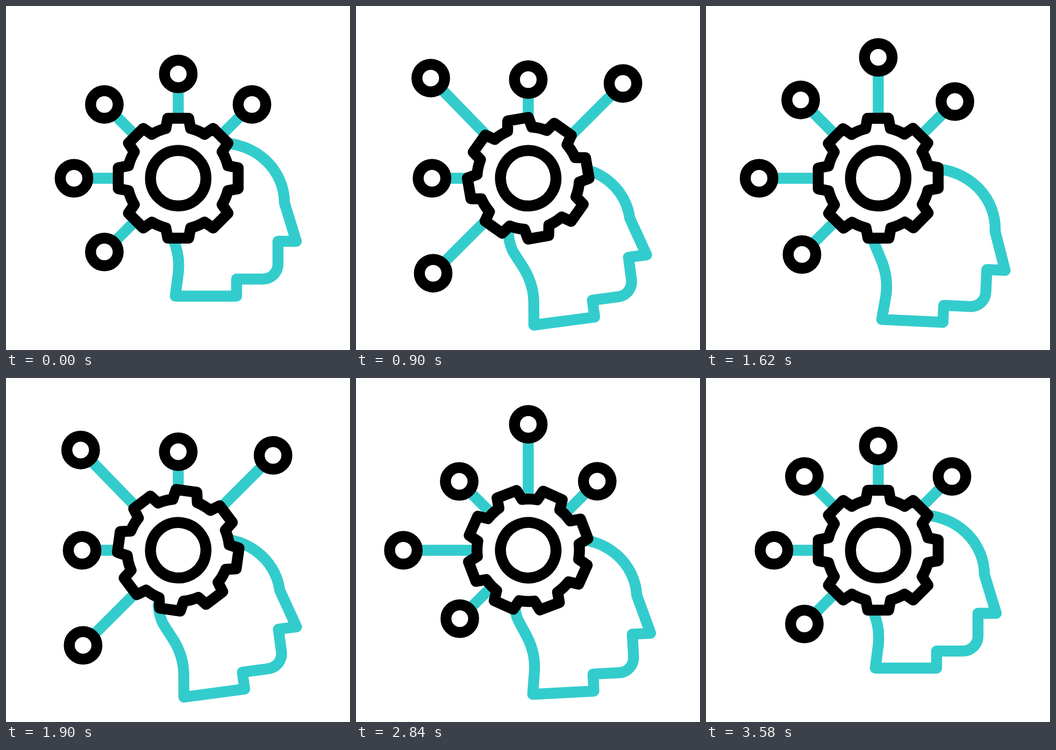
An HTML page for the animation above (3600 ms loop, 640 by 640 pixels).

```html
<!DOCTYPE html>
<html lang="en">
<head>
<meta charset="utf-8">
<title>Thinking head</title>
<style>
  html, body { margin: 0; height: 100%; overflow: hidden; background: #fff; }
  svg { display: block; width: 100%; height: 100%; }
  path, circle, line { stroke-width: 20.4; stroke-linejoin: round; stroke-linecap: round; }
  .teal { stroke: #33cccc; fill: none; }
  .black { stroke: #000; fill: #fff; }
</style>
</head>
<body>
<svg viewBox="0 0 640 640">
  <path id="head" class="teal" d="M375 256 Q388 255 400 255 A118 111 0 0 1 518 366 L540 437.7 H506 V480
    A28 28 0 0 1 478 508 H429 V539.7 H315 L320.5 497 C323 475 320 455 311 434 L295 400 C291 390 290 378 290 365"/>
  <g id="lines"></g>
  <g id="gear">
    <path id="teeth" class="black"/>
    <circle class="black" r="51.6"/>
  </g>
  <g id="nodes"></g>
</svg>
<script>
const LOOP = 3600, CENTER = 320.4;
const $ = id => document.getElementById(id);

function add(parent, tag, attrs) {
  const el = document.createElementNS('http://www.w3.org/2000/svg', tag);
  set(el, attrs);
  return parent.appendChild(el);
}

function set(el, attrs) {
  for (const key in attrs) el.setAttribute(key, attrs[key]);
}

// Eased value at time t on a track of [time, value] keys
function track(t, keys) {
  if (t <= keys[0][0]) return keys[0][1];
  for (let i = 1; i < keys.length; i++) {
    const [t0, v0] = keys[i - 1], [t1, v1] = keys[i];
    if (t < t1) {
      const u = (t - t0) / (t1 - t0);
      return v0 + (v1 - v0) * u * u * (3 - 2 * u);
    }
  }
  return keys[keys.length - 1][1];
}

// Swing from rest, twice between a and b, then back to rest
const swing = (t, rest, a, b) =>
  track(t, [[200, rest], [800, a], [1400, b], [2000, a], [2600, b], [3400, rest]]);

// Each node: [rest, a, b] for x and for y
const nodes = [
  { x: [126.5, 146.6, 77.5], y: [320.5, 320.5, 320.5] },
  { x: [183, 134.5, 194.6], y: [183.2, 129.2, 194.9] },
  { x: [320.5, 320.5, 320.5], y: [126.4, 142, 75] },
  { x: [457.6, 500.8, 446.4], y: [183.2, 140, 194.5] },
  { x: [183, 139.3, 195.9], y: [457.6, 501.5, 445] }
].map(n => ({
  ...n,
  line: add($('lines'), 'line', { class: 'teal', x2: CENTER, y2: CENTER }),
  ring: add($('nodes'), 'circle', { class: 'black', r: 25.7 })
}));

function teethPath() {
  const at = (r, deg) => {
    const a = deg * Math.PI / 180;
    return `${(r * Math.sin(a)).toFixed(2)} ${(-r * Math.cos(a)).toFixed(2)}`;
  };
  let d = '';
  for (let a = 0; a < 360; a += 45) {
    d += a ? `A95.3 95.3 0 0 1 ${at(95.3, a - 14)}` : `M${at(95.3, -14)}`;
    d += `L${at(113.2, a - 9.9)}L${at(113.2, a + 9.9)}L${at(95.3, a + 14)}`;
  }
  return d + `A95.3 95.3 0 0 1 ${at(95.3, -14)}Z`;
}
$('teeth').setAttribute('d', teethPath());

function draw(t) {
  for (const n of nodes) {
    const x = swing(t, ...n.x), y = swing(t, ...n.y);
    set(n.ring, { cx: x, cy: y });
    set(n.line, { x1: x, y1: y });
  }

  const spin = track(t, [[200, 0], [1930, 98], [3290, 180]]);
  set($('gear'), { transform: `translate(${CENTER} ${CENTER}) rotate(${spin})` });

  const shift = track(t, [[200, 0], [800, 1], [2800, 1], [3400, 0]]);
  const tilt = track(t, [[200, 0], [800, -8.8], [1400, 7.8], [2000, -8.8],
    [2600, 7.8], [3000, -8.8], [3400, 0]]);
  set($('head'), {
    transform: `translate(${12.8 * shift} ${46.3 * shift}) rotate(${tilt} 375 520)`
  });
}

const start = performance.now();
function tick() {
  draw((performance.now() - start) % LOOP);
  requestAnimationFrame(tick);
}
tick();
</script>
</body>
</html>
```
